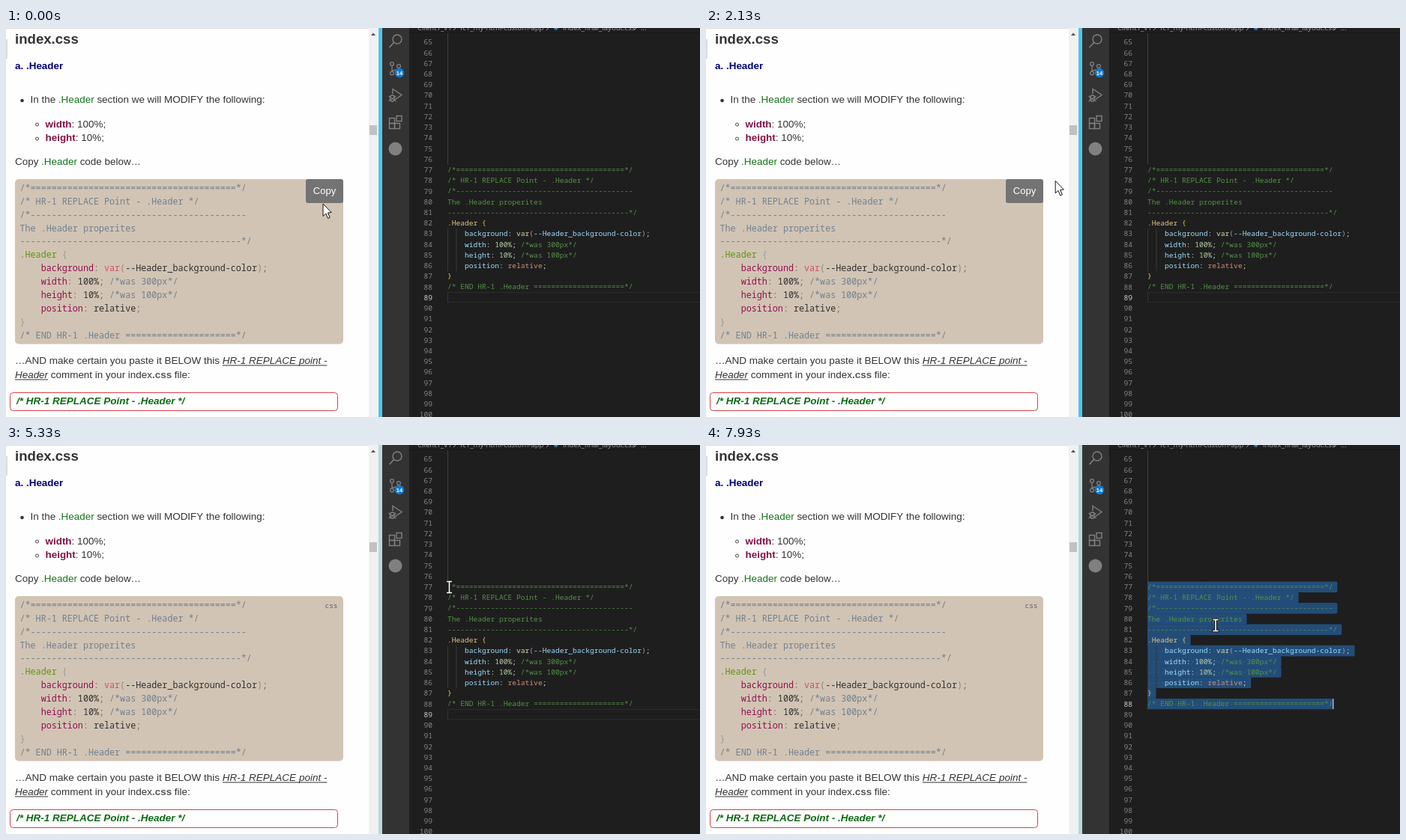
Write an HTML page with a canvas that moves like this. It is 926x520 px and loops after 8000 ms.

```html
<!DOCTYPE html>
<html lang="en">
<head>
<meta charset="utf-8">
<title>Copy and select</title>
<style>
html, body { margin: 0; width: 100%; height: 100%; overflow: hidden; background: #fefefe; }
canvas { display: block; }
</style>
</head>
<body>
<canvas id="stage" width="926" height="520"></canvas>
<script>
const ctx = document.getElementById('stage').getContext('2d');
const LOOP = 8000;
const SANS = '"Liberation Sans", Arial, sans-serif';
const MONO = '"Noto Sans Mono", "DejaVu Sans Mono", monospace';

// The first letter of each token names its colour.
const CODE = [
  ['c/*' + '='.repeat(39) + '*/'],
  ['c/* HR-1 REPLACE Point - .Header */'],
  ['c/*' + '-'.repeat(41)],
  ['cThe .Header properites'],
  ['c' + '-'.repeat(42) + '*/'],
  ['s.Header ', 'b{'],
  ['n    background', 'p: ', 'fvar', 'q(', 'v--Header_background-color', 'q)', 'p;'],
  ['n    width', 'p: ', 'm100%', 'p; ', 'c/*was 300px*/'],
  ['n    height', 'p: ', 'm10%', 'p; ', 'c/*was 100px*/'],
  ['n    position', 'p: ', 'rrelative', 'p;'],
  ['b}'],
  ['c/* END HR-1 .Header ' + '='.repeat(21) + '*/']
];
const PLAIN = CODE.map(line => line.map(tok => tok.slice(1)).join(''));
const LIGHT = { c: '#708090', s: '#5f9410', b: '#999', n: '#90104f', p: '#77706c',
  f: '#d0506a', q: '#8c8680', v: '#303030', m: '#303030', r: '#303030' };
const DARK = { c: '#549247', s: '#e0c584', b: '#e8c84a', n: '#9cdcfe', p: '#d4d4d4',
  f: '#dcdcaa', q: '#c586c0', v: '#9cdcfe', m: '#b5cea8', r: '#ce9178' };

const ROW = 14.23, CHAR = 5.76, CODE_X = 589, FIRST_Y = 189.6;
const lineY = n => FIRST_Y + (n - 77) * ROW;

// Pointer path: time, x, y
const PATH = [
  [0, 423, 235], [300, 423, 235], [750, 430, 212], [1750, 430, 212],
  [2150, 468, 204], [2700, 580, 188], [3060, 585, 187], [3500, 585, 190],
  [4000, 587, 199], [4500, 588, 200], [5000, 593, 190], [5650, 590, 190],
  [6050, 687, 246], [6230, 746, 293], [6700, 842, 346], [7150, 842, 346],
  [7650, 680, 241], [8000, 680, 241]
];
const SELECT_FROM = 5650, SELECT_TO = 6900, LAG = 180;

const clamp = (v, lo, hi) => Math.max(lo, Math.min(hi, v));
const ramp = (t, from, to) => clamp((t - from) / (to - from), 0, 1);

function pointerAt(t) {
  let i = 1;
  while (i < PATH.length - 1 && PATH[i][0] < t) i++;
  const [t0, x0, y0] = PATH[i - 1], [t1, x1, y1] = PATH[i];
  const k = ramp(t, t0, t1);
  return { x: x0 + (x1 - x0) * k, y: y0 + (y1 - y0) * k };
}

function caretAt(t) {
  const late = t - LAG;
  if (late < SELECT_FROM) return null;
  const p = pointerAt(Math.min(late, SELECT_TO));
  const row = clamp(Math.floor((p.y - FIRST_Y) / ROW + 0.5), 0, 11);
  const col = clamp(Math.round((p.x - CODE_X) / CHAR), 0, PLAIN[row].length);
  return { row, col };
}

function rect(x, y, w, h, fill) {
  ctx.fillStyle = fill;
  ctx.fillRect(x, y, w, h);
}

function box(x, y, w, h, r, fill, stroke) {
  ctx.beginPath();
  ctx.roundRect(x, y, w, h, r);
  if (fill) { ctx.fillStyle = fill; ctx.fill(); }
  if (stroke) { ctx.strokeStyle = stroke; ctx.stroke(); }
}

function disc(x, y, r, fill, stroke) {
  ctx.beginPath();
  ctx.arc(x, y, r, 0, 7);
  if (fill) { ctx.fillStyle = fill; ctx.fill(); }
  if (stroke) { ctx.strokeStyle = stroke; ctx.stroke(); }
}

function line(color, width, ...pts) {
  ctx.strokeStyle = color;
  ctx.lineWidth = width;
  ctx.beginPath();
  pts.forEach(([x, y]) => ctx.lineTo(x, y));
  ctx.stroke();
  ctx.lineWidth = 1;
}

function text(str, x, y, font, color, align = 'left') {
  ctx.font = font;
  ctx.fillStyle = color;
  ctx.textAlign = align;
  ctx.fillText(str, x, y);
  return x + ctx.measureText(str).width;
}

// Runs of [text, colour, style, underlined] set one after another.
function runs(x, y, list, size = 13.45) {
  for (const [str, color = '#333', style = '', under] of list) {
    const end = text(str, x, y, `${style} ${size}px ${SANS}`, color);
    if (under) rect(x, y + 1.5, end - x, 1, color);
    x = end;
  }
}

function codeLine(tokens, x, y, size, colors) {
  for (const tok of tokens) x = text(tok.slice(1), x, y, `${size}px ${MONO}`, colors[tok[0]]);
}

function drawPage(t) {
  const green = '#14731a', wine = '#861048';
  rect(0, 0, 484, 520, '#fefefe');
  rect(0, 0, 484, 1, '#dedede');
  rect(0, 15, 2, 26, '#dcdcdc');

  runs(12, 21, [['index.css', '#333', 'bold']], 18.6);
  runs(12, 55, [['a. .Header', '#000074', 'bold']]);
  disc(21.5, 97, 2.3, '#333');
  runs(32.5, 100.3, [['In the '], ['.Header', green], [' section we will MODIFY the following:']]);
  disc(41.5, 129, 2, null, '#444');
  disc(41.5, 148, 2, null, '#444');
  runs(52.5, 132.5, [['width', wine, 'bold'], [': 100%;']]);
  runs(52.5, 151, [['height', wine, 'bold'], [': 10%;']]);
  runs(12, 183, [['Copy '], ['.Header', green], [' code below…']]);

  box(12, 202, 438, 220.5, 5, '#d2c4b4');
  CODE.forEach((tokens, i) => codeLine(tokens, 18.5, 217.8 + i * 17.9, 11.72, LIGHT));
  drawToolbar(t);

  runs(12, 449, [['…AND make certain you paste it BELOW this '],
    ['HR-1 REPLACE point -', '#333', 'italic', true]], 13.5);
  runs(12, 468, [['Header', '#333', 'italic', true], [' comment in your index'],
    ['.css', '#555', 'bold'], [' file:']]);
  box(5.5, 487.5, 437, 24, 4, '#fefefe', '#d8404a');
  runs(14, 502.5, [['/* HR-1 REPLACE Point - .Header */', '#0d6a14', 'italic bold']], 13.5);

  rect(484, 0, 13, 520, '#f1f1f1');
  rect(485, 130, 10, 13, '#c1c1c1');
  ctx.fillStyle = '#505050';
  ctx.beginPath();
  ctx.moveTo(487, 10); ctx.lineTo(490, 6.5); ctx.lineTo(493, 10);
  ctx.fill();

  // The divider pales when the page loses the pointer.
  rect(497, 0, 5, 520, '#50c4ec');
  ctx.globalAlpha = ramp(t, 3150, 3450);
  rect(497, 0, 5, 520, '#b8d8de');
  ctx.globalAlpha = 1;
}

function drawToolbar(t) {
  const away = ramp(t, 3150, 3450);
  if (away > 0) {
    ctx.globalAlpha = away;
    text('css', 434, 217.5, `9.5px ${MONO}`, '#5c5f66', 'center');
  }
  ctx.globalAlpha = 1 - away;
  if (away < 1) {
    box(400, 202, 50, 32, 3, '#747373');
    text('Copy', 425, 221.5, `13px ${SANS}`, '#fff', 'center');
  }
  ctx.globalAlpha = 1;
  if (t > 1000 && t < 2000) {
    box(298.5, 206.5, 46.5, 22.5, 1, '#676767', '#5a5a5a');
    text('Copied', 321.5, 221.5, `10.7px ${SANS}`, '#fff', 'center');
  }
}

function drawActivityBar() {
  const gray = '#808080';
  rect(502, 0, 36, 520, '#333');
  ctx.lineWidth = 1.4;
  disc(522, 15, 6, null, gray);
  line(gray, 1.6, [517.5, 19.5], [511.5, 26]);

  ctx.lineWidth = 1.3;
  disc(515, 48, 2.4, null, gray);
  disc(524, 51, 2.4, null, gray);
  disc(515, 60.5, 2.4, null, gray);
  line(gray, 1.3, [515, 50.5], [515, 58]);
  line(gray, 1.3, [524, 53.5], [522, 56], [515, 57]);
  disc(525, 60, 6.2, '#0e7ad0');
  text('14', 525, 62.8, `bold 7.5px ${SANS}`, '#fff', 'center');

  line(gray, 1.4, [516, 88], [516, 81.5], [528, 89.5], [519.5, 95.5]);
  ctx.lineWidth = 1.3;
  box(512.5, 90, 6, 8, 3, null, gray);
  line(gray, 1.1, [510.5, 91], [520.5, 98]);
  line(gray, 1.1, [520.5, 91], [510.5, 98]);

  ctx.lineWidth = 1.4;
  ctx.strokeStyle = gray;
  ctx.strokeRect(511.5, 120.5, 7, 7);
  ctx.strokeRect(511.5, 127.5, 7, 7);
  ctx.strokeRect(518.5, 127.5, 7, 7);
  ctx.strokeRect(521, 117.5, 7, 7);
  ctx.lineWidth = 1;

  disc(519.5, 161.5, 9, gray);
}

function drawSelection(caret) {
  for (let row = 0; row <= caret.row; row++) {
    const last = row === caret.row;
    const cols = last ? caret.col : PLAIN[row].length + 1;
    const y = lineY(77 + row) - ROW / 2;
    box(CODE_X, y, cols * CHAR, ROW + (last ? 0 : 0.3), [0, 2, 2, 0], '#234d78');
  }
}

function drawSpaces(caret) {
  for (let row = 0; row <= caret.row; row++) {
    const stop = row === caret.row ? caret.col : PLAIN[row].length;
    for (let col = 0; col < stop; col++) {
      if (PLAIN[row][col] === ' ')
        rect(CODE_X + (col + 0.4) * CHAR, lineY(77 + row), 1.2, 1.2, '#42678a');
    }
  }
}

function drawEditor(t) {
  const caret = caretAt(t);
  const active = caret ? 77 + caret.row : 89;
  rect(538, 0, 388, 520, '#1e1e1e');

  if (caret) drawSelection(caret);
  else {
    rect(CODE_X, 353, 337, 1, '#2b2b2b');
    rect(CODE_X, 366, 337, 1, '#2b2b2b');
    rect(CODE_X, 353, 1, 14, '#343434');
  }
  rect(CODE_X, 7, 1, 175, '#404040');
  rect(CODE_X, 268, 1, 57, '#383838');
  rect(CODE_X + 11.5, 268, 1, 57, '#383838');
  if (caret) drawSpaces(caret);

  for (let n = 65; n <= 100; n++)
    text(n, 569, lineY(n) + 3.5, `9.6px ${MONO}`, n === active ? '#d0d0d0' : '#858585', 'right');
  CODE.forEach((tokens, i) => codeLine(tokens, CODE_X, lineY(77 + i) + 3.3, 9.6, DARK));

  if (caret) rect(CODE_X + caret.col * CHAR - 0.5, lineY(active) - 7, 1.3, 14, '#c8c8c8');

  const fold = ramp(t, 2450, 2700) * (1 - ramp(t, 4800, 5100));
  if (fold > 0) {
    ctx.globalAlpha = fold;
    for (const y of [218.5, 261]) line('#c5c5c5', 1.2, [576.5, y - 1.5], [580.3, y + 2.2], [584, y - 1.5]);
    ctx.globalAlpha = 1;
  }
  drawBreadcrumb();
}

function drawBreadcrumb() {
  const font = '9.6px "Open Sans", "Noto Sans", sans-serif', gray = '#a0a0a0';
  rect(538, 0, 388, 6, '#1e1e1e');
  text('Client1_v1', 549, 3, font, gray);
  text('fc1_my-html-custom-app', 606, 3, font, gray);
  text('#', 731, 3, `bold ${font}`, '#519aba');
  text('index_final_layout.css', 743, 3, font, gray);
  text('...', 847, 3, font, gray);
  for (const x of [597, 721, 838]) line(gray, 1, [x, -3], [x + 3, 0], [x, 3]);
  rect(538, 6, 388, 1, '#171717');
}

function shape(x, y, pts, fill, stroke) {
  ctx.beginPath();
  pts.forEach(([dx, dy]) => ctx.lineTo(x + dx, y + dy));
  ctx.closePath();
  ctx.fillStyle = fill;
  ctx.fill();
  ctx.strokeStyle = stroke;
  ctx.stroke();
}

function drawArrow(x, y) {
  shape(x, y, [[0, 0], [0, 16.5], [3.8, 13], [6.6, 19.5], [9.2, 18.4], [6.4, 12], [11.2, 11.6]],
    '#fff', '#111');
}

function drawHand(x, y) {
  ctx.lineJoin = 'round';
  shape(x, y, [[-1.6, 0], [0, -1.2], [1.6, 0], [1.6, 6], [4.2, 5.6], [5, 6.6], [7.2, 6.6],
    [8, 8], [9.4, 8.6], [9.4, 14], [7.6, 17], [7.6, 19.5], [-1, 19.5], [-1.4, 16.5],
    [-5, 11.5], [-5, 9], [-3, 9], [-1.6, 10.6]], '#fff', '#111');
  for (const dx of [1.6, 4.4, 7.2]) line('#111', 0.9, [x + dx, y + 6], [x + dx, y + 10]);
  ctx.lineJoin = 'miter';
}

function drawBeam(x, y) {
  for (const [color, width, grow] of [['#111', 3.6, 1], ['#fff', 1.6, 0]]) {
    const w = 3.6 + grow, h = 7.5;
    line(color, width, [x - w, y - h], [x + w, y - h]);
    line(color, width, [x, y - h], [x, y + h]);
    line(color, width, [x - w, y + h], [x + w, y + h]);
  }
}

function drawPointer(t) {
  const { x, y } = pointerAt(t);
  if (x >= 400 && x <= 450 && y > 202 && y < 234) drawHand(x, y);
  else if (x > CODE_X) drawBeam(x, y);
  else drawArrow(x, y);
}

function frame(now) {
  const t = now % LOOP;
  drawPage(t);
  drawActivityBar();
  drawEditor(t);
  drawPointer(t);
  requestAnimationFrame(frame);
}
requestAnimationFrame(frame);
</script>
</body>
</html>
```
